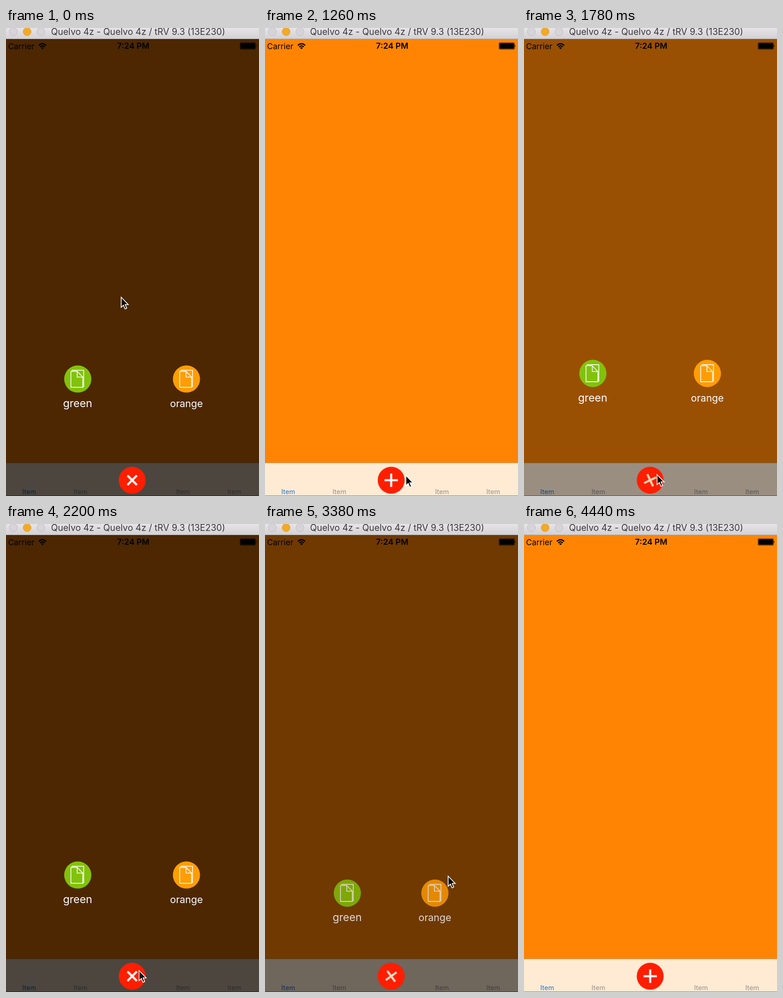
An HTML page for the animation above (4.46 s loop, 551 by 1016 pixels).

```html
<!DOCTYPE html>
<html lang="en">
<head>
<meta charset="utf-8">
<title>Pop-up tab menu</title>
<style>
  html, body { margin: 0; width: 100%; height: 100%; overflow: hidden; background: #ff8403; }
  svg { display: block; width: 551px; height: 1016px; font-family: Inter, Roboto, sans-serif; }
  .mid { text-anchor: middle; }
  .mask, .item, .cross, .cursor { animation: 4460ms ease-in-out infinite; }

  .mask { animation-name: mask; }
  @keyframes mask {
    0%, 18.09% { opacity: .7; }
    22.58%, 37.53% { opacity: 0; }
    42%, 74.44% { opacity: .7; }
    78.92%, 100% { opacity: 0; }
  }

  /* --side: 1 when the button lies to the right of the item, -1 to the left */
  .item { animation-name: item; }
  @keyframes item {
    0%, 18.09% { transform: none; opacity: 1; }
    22.58%, 37.4% { transform: translate(calc(var(--side) * 118.5px), 203px); opacity: 0; }
    37.4% { animation-timing-function: ease-out; }
    39.5% { opacity: 1; }
    40.25% { transform: translate(calc(var(--side) * -9.5px), -17.5px); opacity: 1; }
    43.16% { transform: translate(calc(var(--side) * .6px), 1.1px); }
    44.84%, 74.44% { transform: none; opacity: 1; }
    78.92%, 100% { transform: translate(calc(var(--side) * 118.5px), 203px); opacity: 0; }
  }

  .cross { animation-name: spin, tint; }
  @keyframes spin {
    0%, 18.09% { transform: rotate(-45deg); }
    22.58%, 37.53% { transform: rotate(0deg); }
    42%, 74.44% { transform: rotate(-45deg); }
    78.92%, 100% { transform: rotate(0deg); }
  }
  @keyframes tint {
    0%, 18.09% { stroke: #fff; }
    19.2%, 20.4% { stroke: #f3dfc8; }
    22.58%, 37.53% { stroke: #fff; }
    38.5%, 40.2% { stroke: #f5d8b6; }
    42%, 74.44% { stroke: #fff; }
    75.6%, 76.8% { stroke: #f3dfc8; }
    78.92%, 100% { stroke: #fff; }
  }

  .cursor { animation-name: point; }
  @keyframes point {
    0%, 3.4% { transform: translate(250px, 583px); }
    13.5%, 21.3% { transform: translate(238px, 520px); }
    27.8%, 29.2% { transform: translate(306px, 970px); }
    33.6%, 50.4% { transform: translate(289px, 968px); }
    61.7%, 75.8% { transform: translate(398px, 763px); }
    75.8% { animation-timing-function: ease-out; }
    81.8%, 82.5% { transform: translate(460px, 640px); }
    82.5% { animation-timing-function: linear; }
    86.1% { transform: translate(472px, 20px); animation-timing-function: linear; }
    87%, 100% { transform: translate(475px, -32px); }
  }
</style>
</head>
<body>
<svg viewBox="0 0 551 1016">
  <defs>
    <linearGradient id="chrome" x2="0" y2="1">
      <stop stop-color="#e6e4e7"/>
      <stop offset="1" stop-color="#d3d1d4"/>
    </linearGradient>
    <g id="pages" fill="none" stroke="#fff" stroke-width="1.6">
      <path d="M-13-19H13.3V17.5"/>
      <path d="M-14.6-16.6H-1L11.2-4.2V18H-14.6ZM-1-16.6V-4.2H11.2"/>
    </g>
  </defs>

  <rect width="551" height="1016" fill="#ff8403"/>

  <g class="mid" font-size="14.6" fill="#95908c">
    <rect y="944" width="551" height="72" fill="#ffebd4"/>
    <rect y="943.5" width="551" height="1" fill="#bf8a50"/>
    <text x="50.5" y="1012" fill="#1b74d1">Item</text>
    <text x="162" y="1012">Item</text>
    <text x="385.5" y="1012">Item</text>
    <text x="497" y="1012">Item</text>
    <rect y="1015" width="551" height="1" fill="#857a70"/>
  </g>

  <rect class="mask" y="24" width="551" height="992"/>

  <g class="mid" fill="#fff">
    <g class="item" style="--side: 1">
      <circle cx="156.3" cy="762" r="29.6" fill="#82c20a"/>
      <use href="#pages" x="156" y="762"/>
      <text x="156" y="823" font-size="23.3">green</text>
    </g>
    <g class="item" style="--side: -1">
      <circle cx="393" cy="762" r="29.6" fill="#ff9d04"/>
      <use href="#pages" x="393" y="762"/>
      <text x="393" y="823" font-size="21.5">orange</text>
    </g>
  </g>

  <g transform="translate(274.8 981.7)">
    <circle r="29.3" fill="#ff1e00"/>
    <path class="cross" d="M-14.5 0H14.5M0-14.5V14.5" stroke="#fff" stroke-width="4.6"/>
  </g>

  <g>
    <text x="4.5" y="45.5" font-size="17.5">Carrier</text>
    <text class="mid" x="277" y="45.2" font-size="17.8" font-weight="600">7:24 PM</text>
    <g fill="none" stroke="#000" stroke-width="2.5">
      <path d="M71.5 37.8Q79.5 30.5 87.5 37.8"/>
      <path d="M74.6 41Q79.5 36.6 84.4 41"/>
    </g>
    <path d="M79.5 46L76.6 43Q79.5 40.4 82.4 43Z"/>
    <rect x="509.5" y="31.5" width="34" height="15" rx="2.2" fill="none" stroke="#000" stroke-opacity=".6"/>
    <rect x="510.5" y="32.7" width="32" height="12.6" rx="1"/>
    <path d="M544 36.5Q546.5 39 544 41.5Z"/>
  </g>

  <g>
    <rect width="551" height="23.5" fill="url(#chrome)"/>
    <rect y="23" width="551" height="1" fill="#b5b0ae"/>
    <g fill="#d6d4d8" stroke="#bdbabf">
      <circle cx="16" cy="8" r="8.7"/>
      <circle cx="46" cy="8" r="8.7" fill="#f1a92a" stroke="#e0a030"/>
      <circle cx="76" cy="8" r="8.7"/>
    </g>
    <text x="98" y="15" font-size="19.5" fill="#3b393b">Quelvo 4z - Quelvo 4z / tRV 9.3 (13E230)</text>
  </g>

  <path class="cursor" d="M.8 1.5V23.4L5.8 18.8L9.4 27L13 25.4L9.5 17.4H16.3Z" stroke="#fff" stroke-width="1.7"/>
</svg>
</body>
</html>
```
